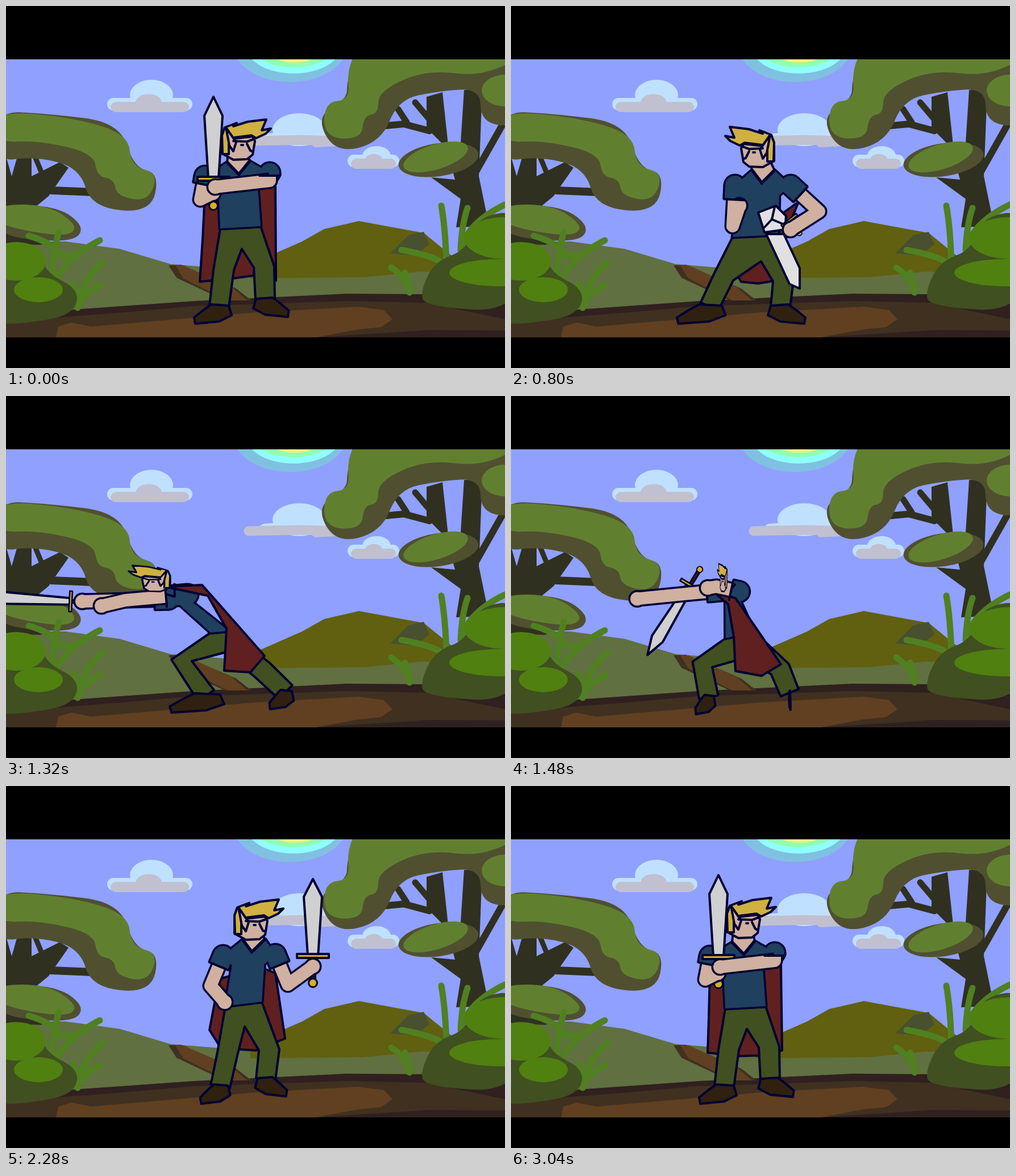
These frames come from a looping animation (878 by 638 pixels, 3320 ms). An HTML page with a canvas:

```html
<!DOCTYPE html>
<html lang="en">
<meta charset="utf-8">
<title>Swordsman</title>
<style>
  html, body { margin: 0; height: 100%; overflow: hidden; background: #000; }
  canvas { display: block; }
</style>
<canvas id="stage" width="878" height="638"></canvas>
<script>
const ctx = document.getElementById('stage').getContext('2d');
const LOOP = 3320, STEP = 40;
const INK = '#000033', SKIN = '#d0b0a0', SHIRT = '#204060', GOLD = '#d8b020';
const LEAF = '#608030', SHADE = '#505030', BARK = '#303020', GRASS = '#508020', BUSH = '#405020', LIME = '#508010';

const mix = (a, b, f) => a + (b - a) * f;
const between = (a, b, f) => a.map((v, i) => mix(v, b[i], f));
const pairs = list => list.reduce((out, v, i) => (i % 2 ? out[out.length - 1].push(v) : out.push([v]), out), []);
const points = text => pairs(text.split(' ').map(Number));

function path(pts) {
  ctx.beginPath();
  pts.forEach(p => ctx.lineTo(...p));
}
function shape(colour, pts) {
  path(pts);
  ctx.closePath();
  ctx.fillStyle = colour;
  ctx.fill();
}
function outlined(colour, pts) {
  shape(colour, pts);
  ctx.strokeStyle = INK;
  ctx.lineWidth = 4;
  ctx.stroke();
}
function line(colour, width, pts, cap = 'round') {
  path(pts);
  ctx.lineCap = cap;
  ctx.strokeStyle = colour;
  ctx.lineWidth = width;
  ctx.stroke();
}
function oval(colour, x, y, rx, ry = rx, turn = 0) {
  ctx.beginPath();
  ctx.ellipse(x, y, rx, ry, turn, 0, 7);
  ctx.fillStyle = colour;
  ctx.fill();
}
// Rounded closed form guided by a few corners
function blob(colour, text) {
  const p = points(text);
  ctx.beginPath();
  p.forEach((a, i) => {
    const mid = between(a, p[(i + 1) % p.length], .5);
    if (i) ctx.quadraticCurveTo(...a, ...mid); else ctx.moveTo(...mid);
  });
  ctx.quadraticCurveTo(...p[0], ...between(p[0], p[1], .5));
  ctx.fillStyle = colour;
  ctx.fill();
}
function cloud(x1, x2, y, bumpX, bumpY, rx, ry) {
  line('#c0e0ff', 22, [[x1, y - 5], [x2, y - 5]]);
  oval('#c0e0ff', bumpX, bumpY, rx, ry);
  line('#c0c0d0', 18, [[x1 + 4, y], [x2 - 4, y]]);
  oval('#c0c0d0', bumpX - 5, y - 8, rx * .6, ry * .55);
}
function tuft(x, y, tips) {
  ctx.beginPath();
  for (const [tx, ty] of points(tips)) {
    ctx.moveTo(x, y);
    ctx.quadraticCurveTo(mix(x, tx, .15), mix(y, ty, .6), tx, ty);
  }
  ctx.lineCap = 'round';
  ctx.strokeStyle = GRASS;
  ctx.lineWidth = 11;
  ctx.stroke();
}

function drawScenery() {
  ctx.fillStyle = '#90a0ff';
  ctx.fillRect(0, 94, 878, 490);
  oval('#80c0e0', 500, 70, 100, 64);
  oval('#90ffff', 506, 70, 84, 49);
  oval('#90ffb0', 506, 70, 73, 38);
  oval('#f0f080', 508, 70, 52, 30);
  cloud(189, 317, 178, 256, 157, 38, 27);
  cloud(612, 681, 278, 652, 264, 25, 17);
  oval('#c0e0ff', 516, 218, 47, 29);
  line('#c0e0ff', 18, points('455 234 580 226'));
  line('#c0c0d0', 17, points('427 238 520 236 585 238'));
  line('#c0c0d0', 14, points('545 242 580 240'));

  shape('#607040', points('0 415 105 415 200 428 290 455 480 470 878 465 878 540 0 540'));
  shape('#606010', points('430 455 521 415 560 393 621 379 735 400 790 445 790 470 730 468 630 478 430 480'));
  shape('#485030', points('676 436 708 404 735 398 745 420 720 440'));
  shape('#302020', points('0 545 118 535 330 520 600 507 740 508 878 525 878 584 0 584'));
  shape('#403020', points('0 556 195 541 330 529 600 520 740 523 878 552 878 572 745 571 545 584 0 584'));
  shape('#604020', points('88 584 92 565 115 558 150 565 440 540 620 530 665 536 680 552 660 566 620 570 545 584'));
  shape('#403020', points('286 457 308 456 405 498 432 519 385 519 300 479'));
  shape('#604020', points('298 457 312 457 398 496 424 519 390 519 312 480'));

  shape(BARK, points('0 265 10 300 20 265 45 265 45 300 95 275 110 285 75 335 35 368 0 365'));
  line(BARK, 14, points('80 325 152 328'));
  line(BARK, 9, points('52 268 66 302'));
  line(BARK, 22, points('0 408 60 410'));
  blob(SHADE, '-20 185 75 190 200 205 225 285 270 295 255 365 150 355 130 285 50 265 -20 275');
  blob(LEAF, '-20 185 110 195 215 225 220 282 268 295 250 345 195 335 190 305 160 300 155 260 60 237 -20 241');
  blob(SHADE, '-20 350 90 352 140 390 115 418 -20 405');
  blob(LEAF, '-20 350 75 350 130 390 100 408 -20 385');

  shape(BARK, points('792 390 800 340 748 302 790 306 775 250 740 215 740 160 768 152 778 245 800 240 806 148 838 148 832 300 850 388'));
  line(BARK, 12, points('668 211 700 208 745 220'));
  line(BARK, 12, points('828 290 872 212'));
  line(BARK, 11, points('690 182 705 205'));
  line(BARK, 11, points('720 170 752 208'));
  blob(SHADE, '620 70 900 70 900 215 835 205 835 145 760 150 690 165 660 240 580 260 545 195 600 165 600 130');
  blob(LEAF, '620 70 930 75 840 125 740 112 655 150 655 190 630 193 625 235 560 232 560 170 605 165 600 115');
  oval(LEAF, 878, 149, 41, 28);
  oval(SHADE, 761, 271, 71, 29, -.15);
  oval(LEAF, 756, 266, 59, 22, -.3);

  tuft(78, 508, '165 413 93 398');
  tuft(95, 440, '40 405 120 440');
  tuft(126, 532, '170 452 166 492 119 490');
  tuft(710, 505, '678 461 702 470');
  tuft(775, 460, '696 430 766 352');
  tuft(800, 430, '812 356 878 350');
  blob(BUSH, '-20 425 60 430 70 470 130 500 118 545 30 560 -20 560');
  oval(LIME, 18, 450, 52, 34);
  oval(LIME, 57, 500, 43, 22);
  blob(BUSH, '730 500 755 450 810 430 830 370 910 360 910 540 735 530');
  oval(LIME, 878, 409, 72, 37);
  oval(LIME, 870, 470, 90, 24);
}

// head: x, y, scale x, scale y, tilt.  body: neck, shoulders, waist ends, crotch.
// legs: knee and ankle.  arms: elbow and hand.  sword: x, y, degrees, blade length, hilt scale.
const guard = {
  head: [408, 250, 1, 1, 0],
  body: [409, 275, 350, 300, 464, 294, 377, 392, 448, 388, 415, 428],
  legs: [383, 465, 375, 530, 454, 460, 456, 518], toes: [-1, .95],
  arms: [342, 341, 364, 330, 464, 308, 368, 319],
  cape: [350, 330, 346, 410, 341, 486, 400, 480, 436, 475, 475, 484, 474, 318],
  sword: [365, 305, -90, 145, 1],
};
const hip = {
  head: [435, 263, -1, 1, 0],
  body: [444, 290, 394, 316, 492, 316, 390, 407, 470, 403, 440, 450],
  legs: [374, 478, 349, 530, 479, 485, 474, 530], toes: [-1.3, 1],
  arms: [390, 388, 402, 352, 542, 362, 492, 394],
  cape: [430, 400, 395, 470, 405, 486, 435, 489, 466, 484, 490, 385, 506, 345],
  sword: [490, 380, -280, 120, 1],
};
const unsheathe = { ...hip, sword: [490, 378, -128, 0, .6] };
const lunge = {
  head: [265, 331, -.85, .65, 0],
  body: [277, 338, 286, 358, 320, 350, 360, 417, 392, 414, 385, 452],
  legs: [309, 466, 352, 528, 450, 482, 492, 522], toes: [-1.45, -.65],
  arms: [215, 360, 134, 362, 210, 360, 168, 370],
  cape: [280, 336, 355, 352, 388, 410, 384, 484, 430, 487, 455, 458, 345, 333],
  sword: [114, 362, -177, 150, .65], capeInFront: true,
};
const slash = {
  head: [575, 329, .95, .75, .15],
  body: [553, 318, 528, 315, 552, 335, 410, 445, 495, 418, 450, 482],
  legs: [388, 486, 340, 536, 516, 480, 487, 525], toes: [1.15, 1.3],
  arms: [440, 332, 384, 349, 640, 292, 674, 280],
  cape: [482, 350, 432, 394, 400, 455, 415, 486, 460, 505, 512, 500, 488, 400],
  sword: [686, 280, -352, 134, .75], capeInFront: true,
};
const stand = {
  head: [430, 250, 1, 1, 0],
  body: [436, 271, 382, 299, 474, 297, 386, 388, 450, 380, 420, 424],
  legs: [390, 470, 377, 530, 463, 465, 457, 517], toes: [-.8, .85],
  arms: [360, 352, 385, 381, 496, 350, 540, 318],
  cape: [375, 340, 358, 430, 378, 462, 440, 466, 491, 445, 474, 330, 450, 320],
  sword: [540, 300, -450, 136, 1],
};
const ready = {
  head: [405, 247, 1, 1, 0],
  body: [412, 269, 362, 297, 454, 297, 375, 394, 444, 378, 414, 424],
  legs: [384, 470, 376, 530, 459, 465, 452, 515], toes: [-.8, .9],
  arms: [348, 343, 405, 351, 484, 346, 519, 312],
  cape: [378, 360, 362, 455, 400, 475, 440, 465, 488, 440, 460, 350, 440, 320],
  sword: [515, 296, -458, 138, 1],
};
const settled = {
  ...guard,
  head: [408, 247, 1, 1, 0],
  cape: [350, 330, 348, 407, 346, 470, 400, 476, 436, 475, 477, 466, 475, 316],
  sword: [365, 302, -450, 145, 1],
};
const keys = [
  [0, guard], [560, hip], [760, hip], [800, unsheathe], [1320, lunge], [1720, slash],
  [2000, slash], [2280, stand], [2440, stand], [2600, ready], [3040, settled], [LOOP, settled],
];

const hairShape = points('-27 11 -16 11 -16 -10 -8 -18 24 -22 32 -17 49 -25 58 -34 42 -31 50 -50 17 -46 -8 -38 -2 -44 -23 -36 -28 -22');
const headShape = points('-28 -14 -28 10 -8 21 16 20 26 12 30 -12 26 -20');
const bootShape = points('-17 -2 -22 15 0 26 42 30 44 19 28 6 14 -4');

function drawHead([x, y, sx, sy, tilt]) {
  ctx.save();
  ctx.translate(x, y);
  ctx.rotate(tilt);
  ctx.scale(sx, sy);
  outlined(SKIN, headShape);
  outlined('#d0b040', hairShape);
  outlined(SKIN, points('-21 -36 -3 -10 -8 6 -15 -4'));
  line(INK, 4, points('-8 -12 16 -11 27 -15'));
  line(INK, 4, points('6 -5 9 -5'));
  line(INK, 4, points('16 -7 22 5 25 6'));
  ctx.restore();
}

function drawSword([x, y, degrees, length, scale]) {
  const box = (x1, x2, half) => [[x1, -half], [x2, -half], [x2, half], [x1, half]];
  ctx.save();
  ctx.translate(x, y);
  ctx.rotate(degrees * Math.PI / 180);
  if (length > 12) {
    const wide = 16 * scale, base = 9 * scale, shoulder = length * .77;
    outlined('#d0d0d0', [[0, -base], [shoulder, -wide], [length, 0], [shoulder, wide], [0, base]]);
  }
  ctx.scale(scale, scale);
  outlined('#302010', box(-40, 0, 4));
  outlined(GOLD, box(-3, 4, 28));
  oval(INK, -47, 0, 9);
  oval(GOLD, -47, 0, 6);
  ctx.restore();
}

// Offsets a point sideways, seen along the direction a to b
function beside(p, a, b, width) {
  const dx = b[0] - a[0], dy = b[1] - a[1], k = width / (Math.hypot(dx, dy) || 1);
  return [p[0] - dy * k, p[1] + dx * k];
}
const legOutline = (top, knee, ankle, side) => [
  beside(knee, top, ankle, 18 * side), beside(ankle, knee, ankle, 17 * side),
  beside(ankle, knee, ankle, -17 * side), beside(knee, top, ankle, -18 * side),
];

function drawArm(cuff, elbow, hand) {
  for (const [colour, extra] of [[INK, 3.5], [SKIN, 0]]) {
    line(colour, 22 + extra * 2, [cuff, elbow, hand], 'butt');
    oval(colour, ...hand, 12 + extra);
  }
  line(INK, 4, [beside(cuff, cuff, elbow, 18), beside(cuff, cuff, elbow, -18)]);
}

function drawTorso(neck, shoulders, waist, cuffs) {
  const collar = [0, 1].map(i => beside(neck, neck, [neck[0] + shoulders[1][1] - shoulders[0][1],
    neck[1] - shoulders[1][0] + shoulders[0][0]], i ? -20 : 20)).sort((a, b) => a[0] - b[0]);
  const notch = between(neck, between(...waist, .5), .2);
  const armpits = shoulders.map((s, i) => between(between(s, shoulders[1 - i], .2), waist[i], .2));
  const body = [collar[0], shoulders[0], armpits[0], waist[0], waist[1], armpits[1], shoulders[1], collar[1], notch];
  line(INK, 7, [...body, body[0]]);
  for (const [colour, extra] of [[INK, 3.5], [SHIRT, 0]]) {
    shoulders.forEach((s, i) => {
      oval(colour, ...s, 17 + extra);
      line(colour, 34 + extra * 2, [s, cuffs[i]], 'butt');
    });
  }
  shape(SHIRT, body);
  line(INK, 4, [collar[0], notch, collar[1]]);
  return [collar[0], notch, collar[1]];
}

function drawFigure(pose, capeInFront, glint) {
  const [neck, shoulderL, shoulderR, waistL, waistR, crotch] = pairs(pose.body);
  const [kneeL, ankleL, kneeR, ankleR] = pairs(pose.legs);
  const [elbowL, handL, elbowR, handR] = pairs(pose.arms);
  const cuffs = [between(shoulderL, elbowL, .35), between(shoulderR, elbowR, .35)];
  const cape = () => outlined('#602020', pairs(pose.cape));
  const [hx, hy] = pose.head;

  if (!capeInFront) cape();
  outlined('#405020', [waistL, ...legOutline(waistL, kneeL, ankleL, 1), crotch,
    ...legOutline(waistR, kneeR, ankleR, -1).reverse(), waistR]);
  [ankleL, ankleR].forEach(([x, y], i) =>
    outlined('#302010', bootShape.map(p => [x + p[0] * pose.toes[i], y + p[1]])));
  outlined(SKIN, [[hx - 16, hy], beside(neck, neck, [neck[0], neck[1] + 1], 20),
    between(neck, between(waistL, waistR, .5), .2), beside(neck, neck, [neck[0], neck[1] + 1], -20), [hx + 16, hy]]);
  drawTorso(neck, [shoulderL, shoulderR], [waistL, waistR], cuffs);
  if (capeInFront) cape();
  if (glint) {
    outlined('#e0e0e0', points('449 402 480 402 508 462 508 498 490 490'));
    outlined('#e0e0e0', points('435 364 466 352 484 370 482 394 446 399'));
    for (const end of points('464 354 446 390 478 384')) line(INK, 4, [[459, 376], end]);
  }
  drawSword(pose.sword);
  drawArm(cuffs[0], elbowL, handL);
  drawArm(cuffs[1], elbowR, handR);
  drawHead(pose.head);
}

function render(now) {
  const time = Math.floor(now % LOOP / STEP) * STEP;
  const next = keys.findIndex(k => k[0] > time);
  const [start, from] = keys[next - 1], [end, to] = keys[next];
  const linear = (time - start) / (end - start), f = linear * linear * (3 - 2 * linear);
  const pose = {};
  for (const part of ['head', 'body', 'legs', 'toes', 'arms', 'cape', 'sword']) {
    pose[part] = between(from[part], to[part], f);
  }
  ctx.fillStyle = '#000';
  ctx.fillRect(0, 0, 878, 638);
  ctx.save();
  ctx.beginPath();
  ctx.rect(0, 94, 878, 490);
  ctx.clip();
  ctx.lineJoin = 'round';
  drawScenery();
  drawFigure(pose, (f < .5 ? from : to).capeInFront, time >= 800 && time < 880);
  ctx.restore();
}

const begin = performance.now();
function tick() {
  render(Math.max(0, performance.now() - begin));
  requestAnimationFrame(tick);
}
tick();
</script>
</html>
```
